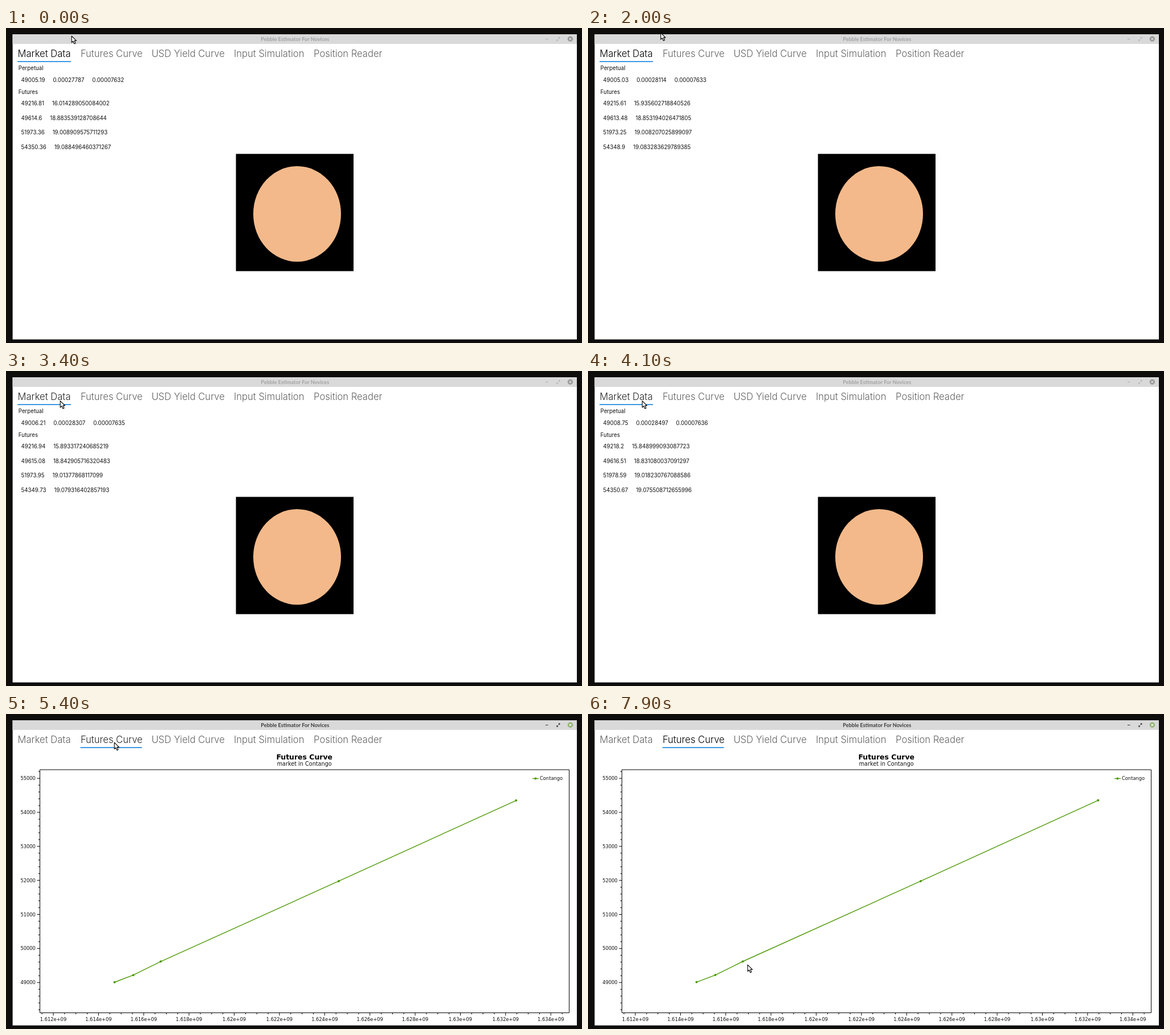
An HTML page that plays this animation: 1011x554 px, repeating every 8 s.

```html
<!DOCTYPE html>
<html lang="en">
<head>
<meta charset="utf-8">
<title>Pebble Estimator For Novices</title>
<style>
  html, body { margin: 0; width: 100%; height: 100%; overflow: hidden; background: #0e0d0c; }
  svg { display: block; width: 1011px; height: 554px; }
  text { white-space: pre; }
  .title { font: 700 9.2px Lato, sans-serif; text-anchor: middle; fill: #a3a3a3; }
  .active .title { fill: #3c3c3c; }
  .controls { fill: none; stroke: #acacac; stroke-width: 1; }
  .active .controls { stroke: #333; stroke-width: 1.2; }
  .close { fill: #999; stroke: none; }
  .active .close { fill: #92b372; }
  .cross { stroke: #e4e4e4; stroke-width: 1.1; }
  .active .cross { stroke: #fff; }
  .tab { font: 300 16.6px Inter, sans-serif; fill: rgba(0,0,0,.62); }
  .tab.hover { fill: rgba(0,0,0,.85); }
  .tab.selected { fill: #000; }
  .tab.selected.hover { fill: rgba(0,0,0,.85); }
  .data { font: 400 9.69px Inter, sans-serif; fill: #111; }
  .chart { font: 8.3px "DejaVu Sans", sans-serif; fill: #111; }
  .heading { font-size: 12.46px; font-weight: 700; text-anchor: middle; fill: #000; }
  .subheading { font-size: 9.69px; text-anchor: middle; }
  .axis { fill: none; stroke: #000; stroke-width: 1; }
  .line { fill: none; stroke: #4e9a06; stroke-width: 1.4; }
  .dot { fill: #4e9a06; }
  .pointer { fill: #fff; stroke: #000; stroke-width: 1.1; stroke-linejoin: round; }
</style>
</head>
<body>
<svg id="stage" viewBox="0 0 1011 554">
  <rect width="1011" height="554" fill="#0e0d0c"/>
  <rect x="11.6" y="11" width="990.4" height="536.7" fill="#fff"/>
  <rect x="11.6" y="11" width="990.4" height="17" fill="#d9d9d9"/>
  <text class="title" x="507.3" y="23.2">Pebble Estimator For Novices</text>
  <g class="controls">
    <path d="M947 19.5h4.5M969.8 18.8l2-2m-2 0h2v2M968.8 20.2l-2 2m2 0h-2v-2"/>
    <circle class="close" cx="990.4" cy="19.3" r="4.7"/>
    <path class="cross" d="M988.5 17.4l3.8 3.8m0-3.8l-3.8 3.8"/>
  </g>
  <g id="tabs"></g>
  <rect id="underline" y="58.3" height="1.5" fill="#0078d7"/>

  <g id="market" class="data">
    <text x="21.8" y="74.4">Perpetual</text>
    <text x="21.8" y="115.5">Futures</text>
    <rect x="403.6" y="221.4" width="206.4" height="206.2" fill="#000"/>
    <ellipse cx="511" cy="327" rx="77" ry="84" fill="#f3b98a"/>
  </g>

  <g id="curve" class="chart">
    <text class="heading" x="523.7" y="80">Futures Curve</text>
    <text class="subheading" x="523.7" y="91.3">market in Contango</text>
    <g id="axes"></g>
    <path class="line" d="M924 113.5h11"/>
    <circle class="dot" cx="929.4" cy="113.5" r="2"/>
    <text x="937" y="116.4">Contango</text>
    <polyline id="line" class="line"/>
    <g id="dots"></g>
  </g>

  <path id="arrow" class="pointer" d="M.7.7V12.1L3.3 9.7 5.4 14.2 7.5 13.2 5.5 8.9H9Z"/>
  <path id="resize" class="pointer" d="M-5.6.6H5.6V2.8H1.2L5 6.6V7.6H1.8V12H-1.8V7.6H-5V6.6L-1.2 2.8H-5.6Z"/>
</svg>
<script>
const LOOP = 8000;
const $ = id => document.getElementById(id);

function add(parent, tag, attrs, text = "") {
  const node = document.createElementNS("http://www.w3.org/2000/svg", tag);
  for (const key in attrs) node.setAttribute(key, attrs[key]);
  node.textContent = text;
  return parent.appendChild(node);
}

// Each step lists only what changes; rows: 0 is the perpetual, 1-4 the futures.
const steps = [
  { t: 0, tab: 0, hover: -1, at: [114.5, 13.5], rows: {
    0: "49005.19 0.00027787 0.00007632", 1: "49216.81 16.014289050084002",
    2: "49614.6 18.883539128708644", 3: "51973.36 19.008909575711293",
    4: "54350.36 19.088496460371267" } },
  { t: 300, rows: { 1: "49216.15 15.964370218405127", 2: "49613.98 18.864327410952603",
    4: "54349.42 19.085142087360914" } },
  { t: 1200, rows: { 1: "49215.61 15.923498344048998", 2: "49613.48 18.848843347533755",
    3: "51973.25 19.008207025899097", 4: "54348.9 19.083283629789385" } },
  { t: 1400, at: [117, 14], rows: { 0: "49005.03 0.00028114 0.00007633",
    1: "49215.61 15.935602718840526" } },
  { t: 1500, at: [121, 14] },
  { t: 1600, at: [124, 13], rows: { 2: "49613.48 18.853194026471805" } },
  { t: 2000, at: [127, 8] },
  { t: 2100, at: [131, 3] },
  { t: 2200, at: [134, 0] },
  { t: 2300, at: [135, 3] },
  { t: 2400, at: [134, 8] },
  { t: 2500, at: [134, 12], resize: true, rows: { 1: "49215.47 15.925082822525097",
    2: "49613.57 18.856660771440726", 3: "51973.95 19.01377868117099",
    4: "54348.51 19.082525638615913" } },
  { t: 3400, at: [94.5, 52], resize: false, hover: 0, rows: {
    0: "49006.21 0.00028307 0.00007635", 1: "49216.94 15.893317240685219",
    2: "49615.08 18.842905716320483", 4: "54349.73 19.079316402857193" } },
  { t: 3700, rows: { 0: "49007.68 0.00028395 0.00007635", 1: "49217.85 15.867204918350642",
    3: "51976.42 19.016203947185027" } },
  { t: 4100, rows: { 0: "49008.75 0.00028497 0.00007636", 1: "49218.2 15.848999093087723",
    2: "49616.51 18.831080037091297", 3: "51978.59 19.018230767088586",
    4: "54350.67 19.075508712655996" } },
  { t: 4400, at: null },
  { t: 4600, at: [188, 51.5], hover: 1, rows: { 0: "49008.14 0.00028497 0.00007636" } },
  { t: 4800, at: [188.5, 51], rows: { 1: "49218.2 15.893420617085294",
    2: "49616.51 18.849237150684302", 4: "54349.98 19.075924106385217" } },
  { t: 5000, at: [189.5, 49.5], rows: { 0: "49007.73 0.00028232 0.00007637",
    1: "49218.2 15.926532553002076", 2: "49616.51 18.863085925800995",
    3: "51978.94 19.027401888695262", 4: "54349.98 19.07708522981293" } },
  { t: 5400, tab: 1 },
  { t: 5900, at: [340, 110], hover: -1 },
  { t: 6100, at: [430, 180], rows: { 0: "49009.5", 4: "54351.2" } },
  { t: 6400, at: [499.5, 121.5], hover: 3 },
  { t: 6700, at: [532, 153], hover: -1 },
  { t: 6900, at: [467, 275], rows: { 0: "49010.6", 4: "54352.4" } },
  { t: 7200, at: [354, 435] },
  { t: 7400, at: [205, 470], rows: { 0: "49011.2", 1: "49219.8", 4: "54354" } },
  { t: 7700, at: [296, 432] },
  { t: 7900, at: [279.5, 440.5], rows: { 2: "49617.4", 4: "54354.8" } }
];

const states = [];
for (const step of steps) {
  const last = states.at(-1) || {};
  states.push({ ...last, ...step, rows: { ...last.rows, ...step.rows } });
}

const tabSpots = [["Market Data", 20.2, 93.8], ["Futures Curve", 130.6, 107.9],
  ["USD Yield Curve", 255.1], ["Input Simulation", 399.6], ["Position Reader", 539.8]];
const tabs = tabSpots.map(([name, x]) => add($("tabs"), "text", { x: x + .3, y: 51 }, name));
const rowLines = [94.9, 136.3, 161.7, 187.1, 212.5].map(y =>
  add($("market"), "text", { x: 26.6, y }));

const xAt = v => 83 + (v - 1.612) * 39695;
const yAt = v => 472.2 - (v - 49000) * .05984;
const expiries = [1.614708, 1.615537, 1.61675, 1.624621, 1.632466];
const dots = expiries.map(v => add($("dots"), "circle", { class: "dot", cx: xAt(v), r: 2 }));

function drawAxes() {
  const axes = $("axes");
  let ticks = "";
  for (let v = 48200; v <= 55200; v += 200) {
    const major = v % 1000 === 0;
    ticks += `M59.5 ${yAt(v)}h${major ? -5 : -2.8}`;
    if (major) add(axes, "text", { x: 51.8, y: yAt(v) + 3, "text-anchor": "end" }, v);
  }
  for (let i = -1; i <= 45; i++) {
    const v = 1.612 + i * .0005, major = i % 4 === 0;
    ticks += `M${xAt(v)} 525.5v${major ? 5 : 2.8}`;
    if (major) add(axes, "text", { x: xAt(v), y: 540.3, "text-anchor": "middle" },
      +v.toFixed(3) + "e+09");
  }
  add(axes, "path", { class: "axis", d: "M59.5 98H988.5V525.5H59.5Z" + ticks });
}

function showRows(rows) {
  rowLines.forEach((line, i) => {
    line.textContent = "";
    rows[i].split(" ").forEach((value, k) => add(line, "tspan", { dx: k ? 14 : 0 }, value));
  });
}

function showCurve(rows) {
  const points = dots.map((dot, i) => {
    const y = yAt(parseFloat(rows[i]));
    dot.setAttribute("cy", y);
    return [xAt(expiries[i]), y];
  });
  $("line").setAttribute("points", points.join(" "));
}

function show(state) {
  const { tab, hover, at, resize, rows } = state;
  $("stage").classList.toggle("active", tab === 1);
  $("market").style.display = tab === 0 ? "" : "none";
  $("curve").style.display = tab === 1 ? "" : "none";
  tabs.forEach((node, i) => node.setAttribute("class",
    `tab${i === tab ? " selected" : ""}${i === hover ? " hover" : ""}`));
  $("underline").setAttribute("x", tabSpots[tab][1]);
  $("underline").setAttribute("width", tabSpots[tab][2]);
  tab === 0 ? showRows(rows) : showCurve(rows);
  for (const id of ["arrow", "resize"]) {
    const visible = at && (id === "resize") === !!resize;
    $(id).style.display = visible ? "" : "none";
    if (visible) $(id).setAttribute("transform", `translate(${at})`);
  }
}

let current;
function tick() {
  const time = performance.now() % LOOP;
  const state = states.findLast(s => s.t <= time);
  if (state !== current) show(current = state);
  requestAnimationFrame(tick);
}
drawAxes();
tick();
</script>
</body>
</html>
```
